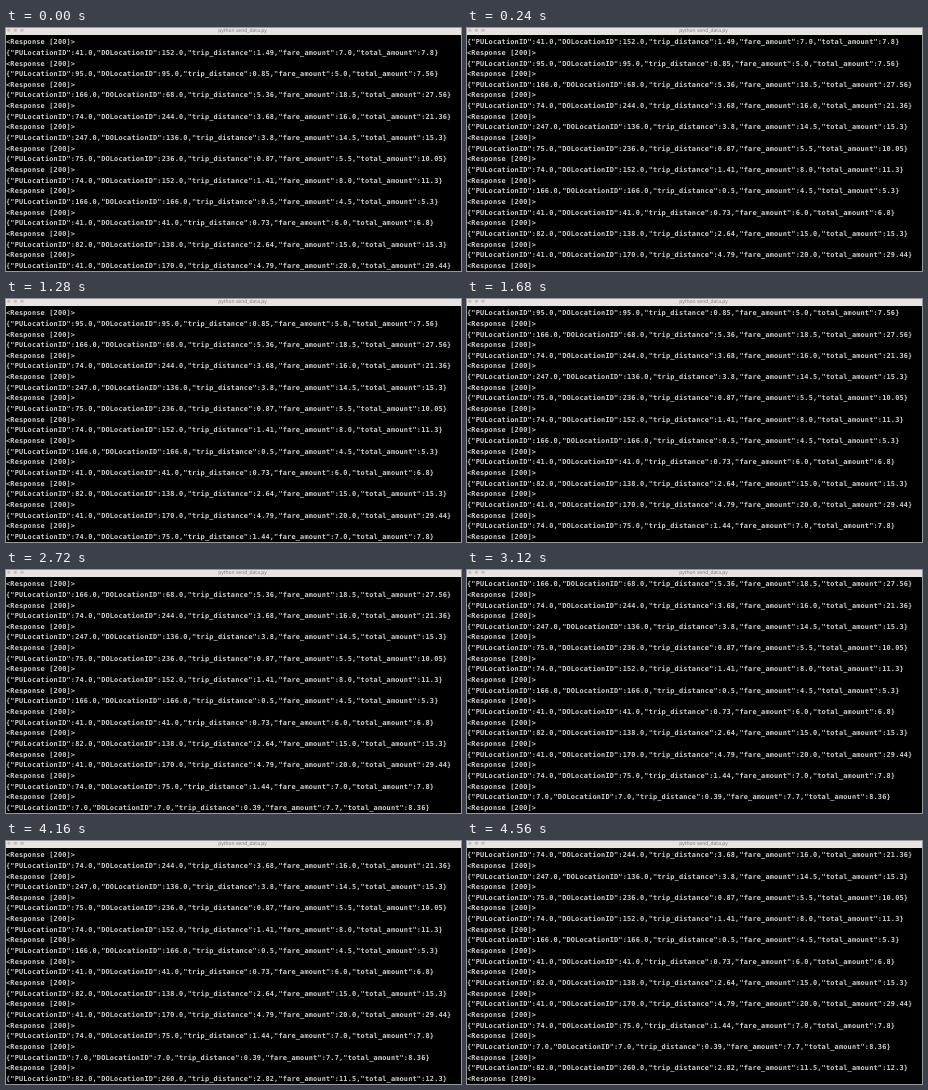
An HTML page for the animation above (5280 ms loop, 455 by 243 pixels).

```html
<!DOCTYPE html>
<html lang="en">
<head>
<meta charset="utf-8">
<title>python send_data.py</title>
<style>
  html, body { margin: 0; width: 100%; height: 100%; overflow: hidden; background: #000; }
  svg { display: block; width: 100vw; height: 100vh; text-rendering: geometricPrecision; }
  #log { font: bold 6.9px "DejaVu Sans Mono", monospace; letter-spacing: .176px; fill: #cecece; }
  #title { font: 5px "Open Sans", sans-serif; fill: #77736f; }
</style>
</head>
<body>
<svg viewBox="0 0 455 243">
  <rect width="455" height="243" fill="#000"/>
  <rect width="455" height="7" fill="#e7e3de"/>
  <g fill="#c9c0b9">
    <circle cx="2.8" cy="2.2" r="1.7"/>
    <circle cx="9.4" cy="2.2" r="1.7"/>
    <circle cx="16" cy="2.2" r="1.7"/>
  </g>
  <text id="title" x="236.5" y="3.7" text-anchor="middle">python send_data.py</text>
  <g id="log"></g>
</svg>
<script>
const LOOP = 5280, PERIOD = 1440, ROWS = 22, TOP = 16.2, STEP = 10.657;
const response = "<Response [200]>";

const records = `
{"PULocationID":41.0,"DOLocationID":152.0,"trip_distance":1.49,"fare_amount":7.0,"total_amount":7.8}
{"PULocationID":95.0,"DOLocationID":95.0,"trip_distance":0.85,"fare_amount":5.0,"total_amount":7.56}
{"PULocationID":166.0,"DOLocationID":68.0,"trip_distance":5.36,"fare_amount":18.5,"total_amount":27.56}
{"PULocationID":74.0,"DOLocationID":244.0,"trip_distance":3.68,"fare_amount":16.0,"total_amount":21.36}
{"PULocationID":247.0,"DOLocationID":136.0,"trip_distance":3.8,"fare_amount":14.5,"total_amount":15.3}
{"PULocationID":75.0,"DOLocationID":236.0,"trip_distance":0.87,"fare_amount":5.5,"total_amount":10.05}
{"PULocationID":74.0,"DOLocationID":152.0,"trip_distance":1.41,"fare_amount":8.0,"total_amount":11.3}
{"PULocationID":166.0,"DOLocationID":166.0,"trip_distance":0.5,"fare_amount":4.5,"total_amount":5.3}
{"PULocationID":41.0,"DOLocationID":41.0,"trip_distance":0.73,"fare_amount":6.0,"total_amount":6.8}
{"PULocationID":82.0,"DOLocationID":138.0,"trip_distance":2.64,"fare_amount":15.0,"total_amount":15.3}
{"PULocationID":41.0,"DOLocationID":170.0,"trip_distance":4.79,"fare_amount":20.0,"total_amount":29.44}
{"PULocationID":74.0,"DOLocationID":75.0,"trip_distance":1.44,"fare_amount":7.0,"total_amount":7.8}
{"PULocationID":7.0,"DOLocationID":7.0,"trip_distance":0.39,"fare_amount":7.7,"total_amount":8.36}
{"PULocationID":82.0,"DOLocationID":260.0,"trip_distance":2.82,"fare_amount":11.5,"total_amount":12.3}
`.trim().split("\n");

// every record is preceded and followed by a response
const lines = records.flatMap(record => [response, record]).concat(response);

const log = document.getElementById("log");
const rows = Array.from({ length: ROWS }, (_, i) => {
  const row = document.createElementNS("http://www.w3.org/2000/svg", "text");
  row.setAttribute("x", 0);
  row.setAttribute("y", TOP + i * STEP);
  return log.appendChild(row);
});

// how often something that repeats every PERIOD has happened by time t
const count = (t, firstAt) => Math.floor((t - firstAt) / PERIOD) + 1;

let shown = -1;
function draw(t) {
  // a record is printed, then 400 ms later its response
  const top = count(t, 240) + count(t, 1280);
  if (top === shown) return;
  shown = top;
  rows.forEach((row, i) => { row.textContent = lines[top + i]; });
}

const start = performance.now();
function tick() {
  draw((performance.now() - start) % LOOP);
  requestAnimationFrame(tick);
}
tick();
</script>
</body>
</html>
```
